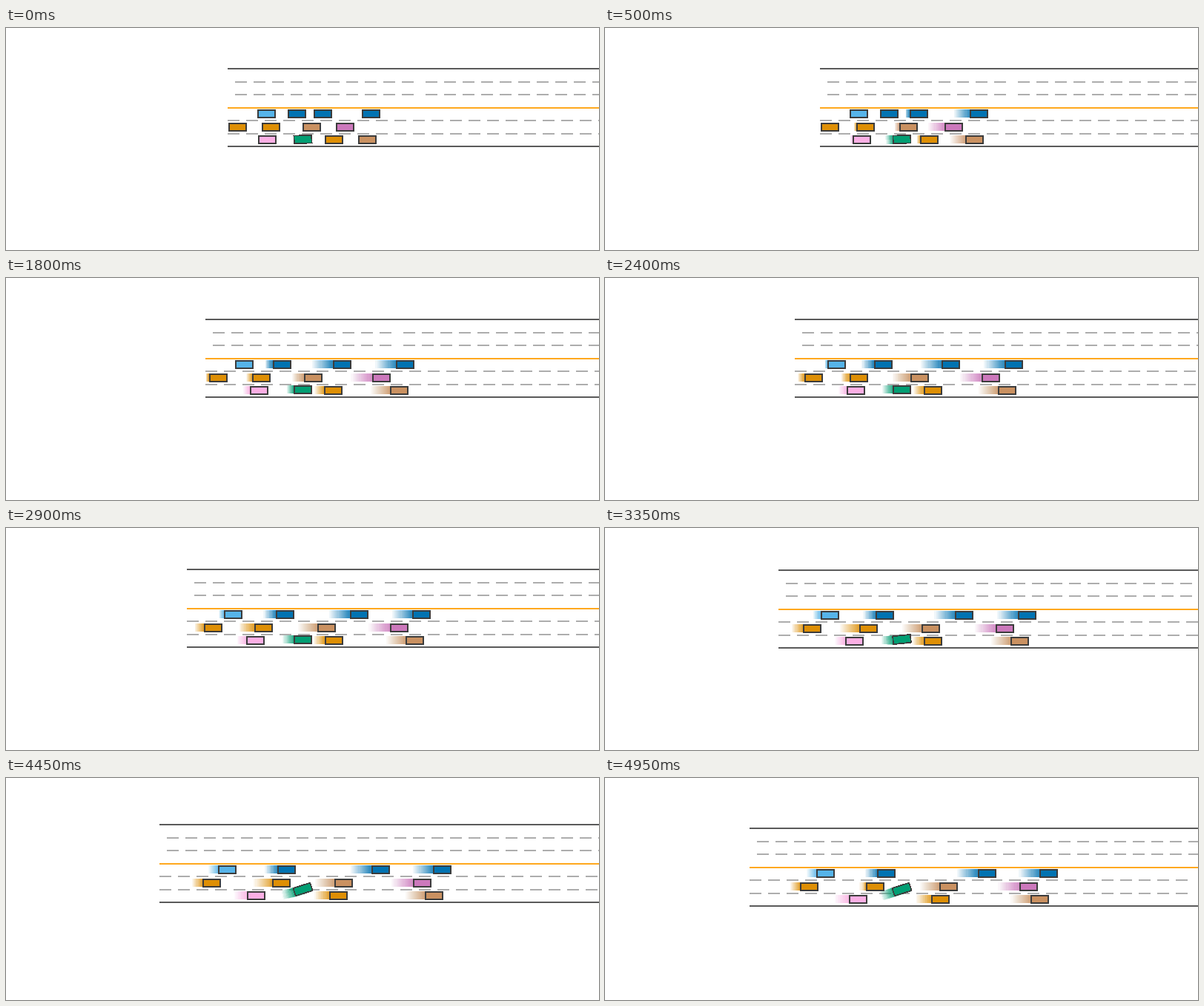
Recreate the animation shown at these times as a matplotlib script. Size 800 by 300 pixels, loop 5 s.

```python
import numpy as np
import matplotlib.pyplot as plt
from matplotlib.animation import FuncAnimation
from matplotlib.collections import PolyCollection
from matplotlib.colors import to_rgba

W, H, DPI = 800, 300, 100
FRAMES, STEP = 100, 50
T = np.arange(FRAMES) * STEP / 1000

EDGE, DASH, CENTRE, OUTLINE = "#5a5a5a", "#adadad", "#ffa81e", "#3c3c3c"
SKY, BLUE, ORANGE, GREEN = "#56b4e9", "#0173b2", "#de8f05", "#029e73"
TAN, PINK, ROSE = "#ca9161", "#cc78bc", "#fbafe4"

CAR_L, CAR_W = 25, 12
LANE_TOP = (56, 74, 91)     # car offsets below the road's upper edge
TRAIL = 13                  # trail length in frames
EGO_X = 400.5               # the camera follows the green car
SLIP = 1.15                 # sideways drift beyond the heading


def ramp(*keys):
    """Straight ramps between (time, value) keys, sampled at every frame."""
    return np.interp(T, *zip(*keys))


def travel(speed):
    """Distance covered in each frame at the given speeds."""
    steps = (speed[1:] + speed[:-1]) / 2 * STEP / 1000
    return np.concatenate(([0], np.cumsum(steps)))


def car(lane, color, start, *speeds):
    return lane, color, start + travel(ramp(*speeds))


# The green car's drive moves the road past the camera.
ego_speed = ramp((0, 18), (1, 18), (1.4, 12), (2.2, 23), (3.3, 23.5),
                 (3.5, 28), (4.2, 22), (5, 24))
heading = ramp((0, 2.7), (1, 2.2), (1.4, -1.5), (3, 2), (3.4, 6.5), (4.3, 17.5))
road_x = 298.6 - travel(ego_speed)
road_y = 53.85 + travel(SLIP * ego_speed * np.tan(np.radians(heading)))
heading = np.where(abs(heading) < 2, 0, heading)

# Lane, colour, start on the road, then (time, speed) keys.
cars = [
    car(0, SKY, 40.5, (1.6, 0), (3.5, 20.5)),
    car(0, BLUE, 81, (1, 0), (1.8, 25.7)),
    car(0, BLUE, 116, (0, 0), (1, 43)),
    car(0, BLUE, 181, (0, 42.4)),
    car(1, ORANGE, 1, (1, 0), (3.1, 25), (5, 19)),
    car(1, ORANGE, 46, (0, 6), (2, 14), (2.9, 41), (4.2, 41), (4.6, 8)),
    car(1, TAN, 101, (0, 12), (1, 15), (2.1, 39)),
    car(1, PINK, 146, (0, 44)),
    car(2, ROSE, 41, (0, 5.8), (5, 32)),
    car(2, ORANGE, 131, (0, 6), (1, 20), (3.2, 24), (3.7, 31)),
    car(2, TAN, 176, (0, 41)),
]


def box(x, y, w, h):
    return [(x, y), (x + w, y), (x + w, y + h), (x, y + h)]


def tilted(cx, cy, w, h, deg):
    a = np.radians(deg)
    c, s = np.cos(a), np.sin(a)
    return [(cx + c * x + s * y, cy - s * x + c * y)
            for x, y in box(-w / 2, -h / 2, w, h)]


def road(x, y):
    for dy, color in ((0, EDGE), (53, CENTRE), (105, EDGE)):
        yield box(x, y + dy, W - x, 2), color
    upper = [*range(10, 260, 25), *range(267, 610, 25)]
    lower = range(0, 600, 25)
    for dy, starts in ((18, upper), (35, upper), (70, lower), (88, lower)):
        for s in starts:
            yield box(x + s, y + dy, 16, 2), DASH


def trails(i, x, y):
    for age in range(min(TRAIL, i), 0, -1):
        j, alpha = i - age, 1 / (age + 3)
        for lane, color, xs in cars:
            yield (box(round(road_x[i] + xs[j]), y + LANE_TOP[lane],
                       CAR_L, CAR_W - 1), to_rgba(color, alpha))
        cx = EGO_X + round(road_x[i] - road_x[j])
        cy = 150.5 + round(road_y[i] - road_y[j])
        yield (tilted(cx, cy, CAR_L, CAR_W - 1, heading[j]),
               to_rgba(GREEN, alpha))


def bodies(i, x, y):
    for lane, color, xs in cars:
        left, top = round(road_x[i] + xs[i]), y + LANE_TOP[lane]
        yield box(left, top, CAR_L, CAR_W), OUTLINE
        yield box(left + 2, top + 2, CAR_L - 4, CAR_W - 4), color
    # A turned body sits half a pixel higher and a touch smaller.
    turn = 0.5 if heading[i] else 0
    for inset, color in ((turn, OUTLINE), (4, GREEN)):
        yield tilted(EGO_X, 151 - turn, CAR_L - inset, CAR_W - inset,
                     heading[i]), color


fig = plt.figure(figsize=(W / DPI, H / DPI), dpi=DPI, facecolor="white")
ax = fig.add_axes([0, 0, 1, 1])
ax.set_xlim(0, W)
ax.set_ylim(H, 0)
ax.axis("off")
scene = PolyCollection([], edgecolors="none", linewidths=0,
                       antialiaseds=[False])
scene.set_snap(False)
ax.add_collection(scene, autolim=False)


def draw(i):
    x, y = round(road_x[i]), round(road_y[i])
    shapes = [*road(x, y), *trails(i, x, y), *bodies(i, x, y)]
    scene.set_verts([pts for pts, _ in shapes])
    scene.set_facecolor([to_rgba(color) for _, color in shapes])
    return [scene]


anim = FuncAnimation(fig, draw, frames=FRAMES, interval=STEP, repeat=True,
                     repeat_delay=0)
plt.show()
```
